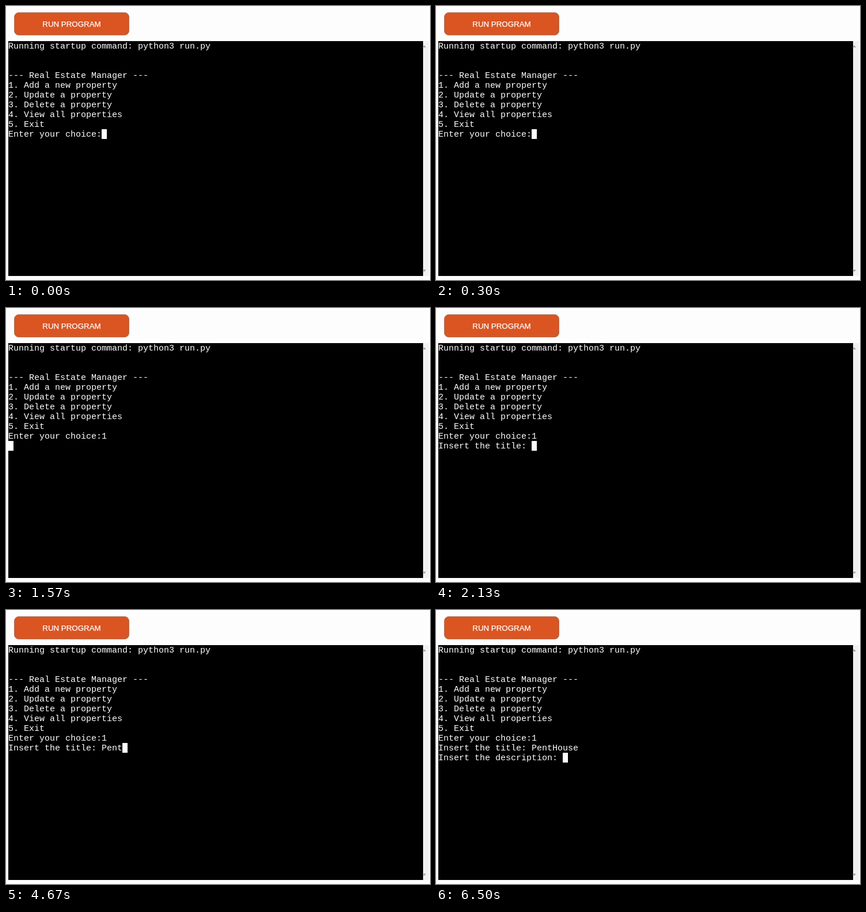
Recreate the animation shown at these times as an HTML page. Size 736 by 476 pixels, loop 8 s.

```html
<!DOCTYPE html>
<html lang="en">
<head>
<meta charset="utf-8">
<title>Terminal session</title>
<style>
  html, body { margin: 0; width: 100%; height: 100%; overflow: hidden; background: #fdfdfd; }
  .stage { position: relative; width: 736px; height: 476px; overflow: hidden; }
  .run {
    position: absolute; left: 14px; top: 11px; width: 200px; height: 40px;
    box-sizing: border-box; border: 1px solid #a67763; border-radius: 8px;
    background: #da5522; color: #fff;
    font: 13.333px/40px "Liberation Sans", Arial, sans-serif; text-align: center;
    -webkit-text-stroke: 0.25px #fff;
  }
  .term {
    position: absolute; left: 4px; top: 61px; width: 720px; height: 408px;
    margin: 0; overflow: hidden; background: #000; color: #fff;
    font: 15px/17px "Liberation Mono", "Courier New", monospace;
  }
  #text { position: relative; top: 1px; }
  .cursor { position: absolute; width: 9px; height: 17px; background: #fff; }
  .bar { position: absolute; left: 724px; top: 61px; width: 10px; height: 408px; background: #f1f1f1; }
  .bar::before, .bar::after {
    content: ""; position: absolute; left: -1px;
    border: solid transparent; border-width: 0 3.5px;
  }
  .bar::before { top: 7px; border-bottom: 4px solid #a3a3a3; }
  .bar::after { bottom: 7px; border-top: 4px solid #a3a3a3; }
</style>
</head>
<body>
<div class="stage">
  <div class="run">RUN PROGRAM</div>
  <pre class="term"><span id="text"></span><i class="cursor" id="cursor"></i></pre>
  <div class="bar"></div>
</div>
<script>
  const LOOP = 8000, CELL_W = 9, CELL_H = 17;
  const text = document.getElementById('text');
  const cursor = document.getElementById('cursor');

  const menu = [
    'Running startup command: python3 run.py', '', '',
    '--- Real Estate Manager ---',
    '1. Add a new property',
    '2. Update a property',
    '3. Delete a property',
    '4. View all properties',
    '5. Exit',
    'Enter your choice:'
  ].join('\n');

  // [time in ms, output]; '\b' removes the last character
  const events = [
    [0, menu], [470, '1'], [1570, '\n'], [1600, 'Insert the title: '],
    [2830, 'P'], [2930, 'e'], [3070, 'n'], [3300, 't'],
    [4270, 'h'], [4670, '\b'], [5070, 'H'],
    [5300, 'o'], [5370, 'u'], [5670, 's'], [5800, 'e'],
    [6470, '\n'], [6500, 'Insert the description: ']
  ];

  const screenAt = t => events
    .filter(([time]) => time <= t)
    .reduce((out, [, s]) => s === '\b' ? out.slice(0, -1) : out + s, '');

  let shown = null;
  function draw(now) {
    const screen = screenAt(now % LOOP);
    if (screen !== shown) {
      const lines = screen.split('\n');
      const row = lines.length - 1;
      text.textContent = shown = screen;
      cursor.style.left = lines[row].length * CELL_W + 'px';
      cursor.style.top = row * CELL_H + 'px';
    }
  }

  const start = performance.now();
  function tick() {
    draw(performance.now() - start);
    requestAnimationFrame(tick);
  }
  tick();
</script>
</body>
</html>
```
